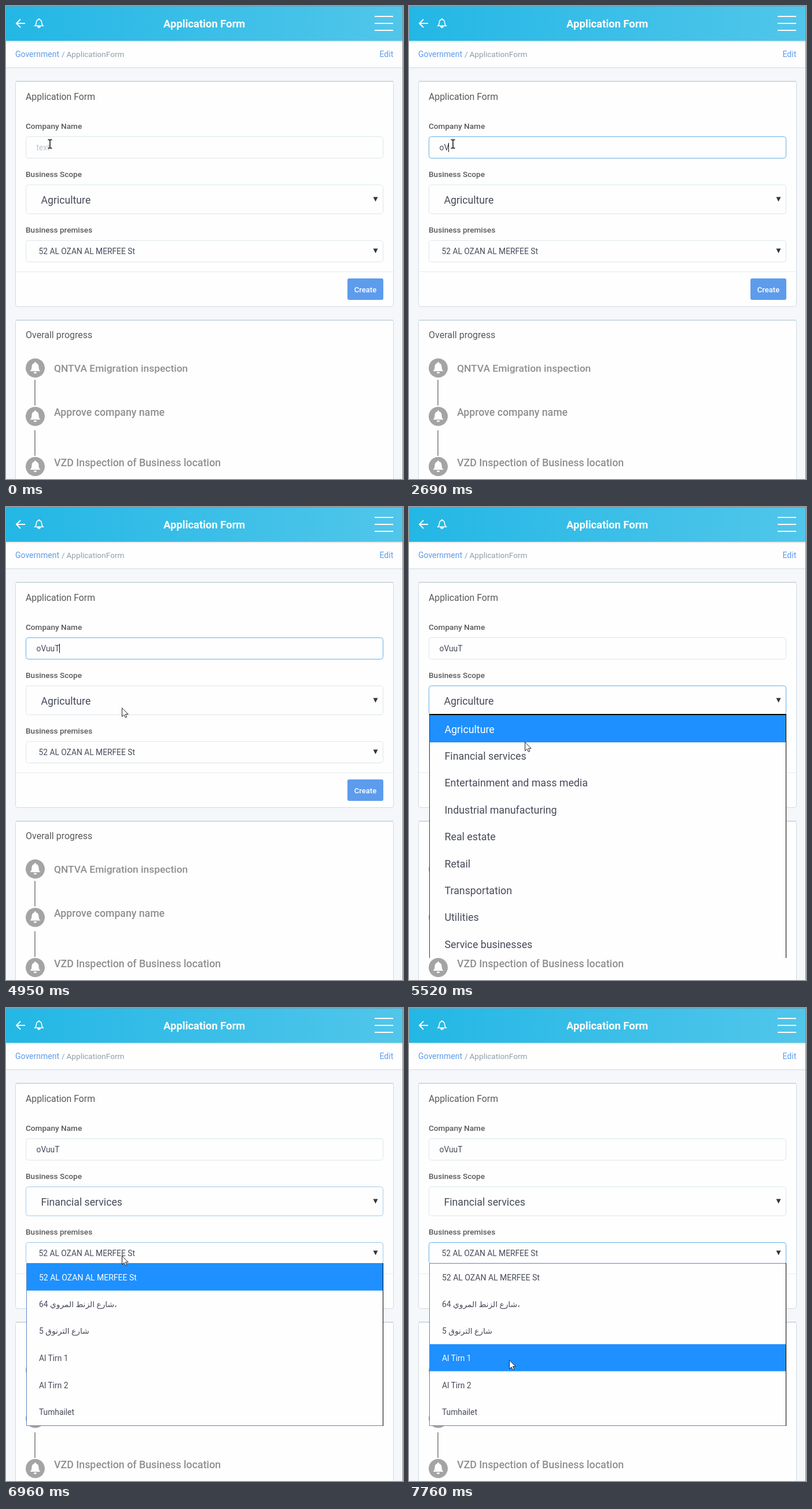
An HTML page for the animation above (8000 ms loop, 686 by 816 pixels).

```html
<!DOCTYPE html>
<html lang="en">
<head>
<meta charset="utf-8">
<title>Application Form</title>
<style>
html, body { margin: 0; width: 100%; height: 100%; overflow: hidden; background: #f5f7fa; }
svg { display: block; width: 686px; height: 816px; font-family: Roboto, 'DejaVu Sans', sans-serif; }
text { white-space: pre; }

.title { fill: #58595b; font-size: 16px; }
.label { fill: #58595b; font-size: 13.6px; font-weight: 500; }
.link { fill: #5d9cec; font-size: 14px; }
.step { fill: #8f8f8f; font-size: 17.7px; font-weight: 500; }
.value { fill: #474b5a; font-size: 13.8px; }
.large { font-size: 17.7px; }
.card { fill: #fefefe; stroke: #cfdbe2; }
.box { fill: #fefefe; stroke: #dde6e9; }
.line { fill: none; stroke: #fff; stroke-width: 2; }

.anim, .on { animation-duration: 8s; animation-iteration-count: infinite; animation-timing-function: linear; }
.on { animation-timing-function: step-end; }

/* focus rings */
@keyframes focusName {
  0%, 12.1%, 66.9%, to { stroke: #dde6e9 }
  13.875%, 65.3% { stroke: #66afe9 }
}
@keyframes focusScope {
  0%, 65.1%, 87.75%, to { stroke: #dde6e9 }
  66.9%, 86.2% { stroke: #66afe9 }
}
@keyframes focusPlace {
  0%, 86% { stroke: #dde6e9 }
  87.75%, to { stroke: #66afe9 }
}

/* typing */
@keyframes hint { 0% { visibility: visible } 28.125%, to { visibility: hidden } }
@keyframes key1 { 0% { visibility: hidden } 28.125%, to { visibility: visible } }
@keyframes key2 { 0% { visibility: hidden } 33.625%, to { visibility: visible } }
@keyframes key3 { 0% { visibility: hidden } 38.125%, to { visibility: visible } }
@keyframes key4 { 0% { visibility: hidden } 40.5%, to { visibility: visible } }
@keyframes key5 { 0% { visibility: hidden } 46.75%, to { visibility: visible } }
@keyframes caret {
  0% { opacity: 0; transform: translateX(53px) }
  12.375% { opacity: 1; transform: translateX(53px) }
  18.25% { opacity: 0; transform: translateX(53px) }
  25.25% { opacity: 1; transform: translateX(53px) }
  28.125% { opacity: 1; transform: translateX(60px) }
  33.625% { opacity: 1; transform: translateX(68px) }
  38.125% { opacity: 1; transform: translateX(76px) }
  40.5% { opacity: 1; transform: translateX(84px) }
  46.75% { opacity: 1; transform: translateX(92px) }
  53.625% { opacity: 0; transform: translateX(92px) }
  60.5% { opacity: 1; transform: translateX(92px) }
  65.375%, to { opacity: 0; transform: translateX(92px) }
}

/* lists */
@keyframes before { 0% { visibility: visible } 77%, to { visibility: hidden } }
@keyframes after { 0% { visibility: hidden } 77%, to { visibility: visible } }
@keyframes scopeList { 0% { visibility: hidden } 66.125% { visibility: visible } 77%, to { visibility: hidden } }
@keyframes placeList { 0% { visibility: hidden } 87%, to { visibility: visible } }
@keyframes scopeBar { 0% { transform: none } 69.71%, to { transform: translateY(46.4px) } }
@keyframes placeBar {
  0% { transform: none }
  90.19% { transform: translateY(46.4px) }
  92.34% { transform: translateY(92.8px) }
  95.7%, to { transform: translateY(139.2px) }
}
@keyframes scope1 { 0% { fill: #fff } 69.71%, to { fill: #474b5a } }
@keyframes scope2 { 0% { fill: #474b5a } 69.71%, to { fill: #fff } }
@keyframes place1 { 0% { fill: #fff } 90.19%, to { fill: #474b5a } }
@keyframes place2 { 0% { fill: #474b5a } 90.19% { fill: #fff } 92.34%, to { fill: #474b5a } }
@keyframes place3 { 0% { fill: #474b5a } 92.34% { fill: #fff } 95.7%, to { fill: #474b5a } }
@keyframes place4 { 0% { fill: #474b5a } 95.7%, to { fill: #fff } }

/* pointer */
@keyframes beam { 0% { visibility: visible } 58.97%, to { visibility: hidden } }
@keyframes arrow { 0% { visibility: hidden } 58.97%, to { visibility: visible } }
@keyframes move {
  0% { transform: translate(76px, 238px) }
  58.25% { transform: translate(76px, 238px); animation-timing-function: steps(6, jump-start) }
  62.6% { transform: translate(200px, 346px) }
  66.875% { transform: translate(200px, 346px); animation-timing-function: steps(4, jump-start) }
  69.71% { transform: translate(200px, 405px); animation-timing-function: steps(3, jump-start) }
  72.21% { transform: translate(201px, 427px) }
  83.875% { transform: translate(200px, 427px) }
  87.34% { transform: translate(200px, 427px); animation-timing-function: steps(7, jump-start) }
  92.34% { transform: translate(173px, 541px); animation-timing-function: steps(6, jump-start) }
  96.375% { transform: translate(173px, 599px); animation-timing-function: steps(2, jump-start) }
  97.6%, to { transform: translate(173px, 607px) }
}
</style>
</head>
<body>
<svg viewBox="0 0 686 816">
  <defs>
    <linearGradient id="bar"><stop stop-color="#23b7e5"/><stop offset="1" stop-color="#51c6ea"/></linearGradient>
    <linearGradient id="shade" x2="0" y2="1"><stop stop-color="#000" stop-opacity=".14"/><stop offset="1" stop-color="#000" stop-opacity="0"/></linearGradient>
    <path id="bell" d="M-9 5.5C-6.4 3.4-6.2 1-6-2.5C-5.8-6-3.6-8-1.3-8.4V-9.2A1.3 1.3 0 0 1 1.3-9.2V-8.4C3.6-8 5.8-6 6-2.5C6.2 1 6.4 3.4 9 5.5ZM-2.6 7H2.6A2.6 2.6 0 0 1-2.6 7Z"/>
    <g id="badge"><circle r="16.5" fill="#a4a4a4"/><use href="#bell" fill="#fff"/></g>
    <path id="down" d="M0 0H8L4 8Z" fill="#333640"/>
  </defs>

  <rect width="686" height="816" fill="#f5f7fa"/>
  <rect y="60" width="686" height="46" fill="#fefefe"/>
  <rect y="106" width="686" height="1" fill="#cfdbe2"/>
  <rect width="686" height="60" fill="url(#bar)"/>
  <rect y="60" width="686" height="3" fill="url(#shade)"/>
  <path class="line" d="M33 30H18M25 23L18 30L25 37"/>
  <g transform="translate(57 30) scale(.76)"><use href="#bell" class="line"/></g>
  <path class="line" d="M637 18H669M637 30H669M637 42H669"/>
  <text x="342.7" y="36.7" fill="#fff" font-size="18.4" font-weight="700" text-anchor="middle">Application Form</text>
  <text class="link" x="16" y="88">Government</text>
  <text x="96" y="88" fill="#909fa7" font-size="13.6">/</text>
  <text x="104.5" y="88" fill="#909fa7" font-size="13.6">ApplicationForm</text>
  <text class="link" x="645.5" y="88">Edit</text>

  <rect class="card" x="16.5" y="129.5" width="653" height="389" rx="4"/>
  <rect x="17" y="129" width="652" height="2" fill="#cfdbe2"/>
  <text class="title" x="34" y="161.5" style="font-size:15.8px">Application Form</text>
  <text class="label" x="34" y="212.3">Company Name</text>
  <text class="label" x="34" y="295.3">Business Scope</text>
  <text class="label" x="34" y="391">Business premises</text>
  <path d="M17 458.5H669" stroke="#e6ecef"/>
  <rect x="590" y="470" width="62" height="37" rx="3" fill="#5d9cec"/>
  <text x="621" y="493.5" fill="#fff" font-size="13.1" font-weight="500" text-anchor="middle">Create</text>

  <rect class="box anim" style="animation-name:focusName" x="34.5" y="225.5" width="617" height="37" rx="4"/>
  <text class="value on" x="52.5" y="249" style="fill:#bcc2ca;animation-name:hint">text</text>
  <text class="value" x="52.5" y="249"><tspan class="on" style="animation-name:key1">o</tspan><tspan class="on" style="animation-name:key2">V</tspan><tspan class="on" style="animation-name:key3">u</tspan><tspan class="on" style="animation-name:key4">u</tspan><tspan class="on" style="animation-name:key5">T</tspan></text>
  <rect class="on" style="animation-name:caret" y="236" width="1" height="16" fill="#111"/>

  <rect class="box anim" style="animation-name:focusScope" x="34.5" y="308.5" width="617" height="50" rx="4"/>
  <text class="value large on" x="60.5" y="340.5" style="animation-name:before">Agriculture</text>
  <text class="value large on" x="60.5" y="340.5" style="animation-name:after">Financial services</text>
  <use href="#down" x="634.5" y="329.5"/>

  <rect class="box anim" style="animation-name:focusPlace" x="34.5" y="404.5" width="617" height="37" rx="4"/>
  <text class="value" x="56.5" y="428">52 AL OZAN AL MERFEE St</text>
  <use href="#down" x="634.5" y="418.5"/>

  <rect class="card" x="16.5" y="541.5" width="653" height="300" rx="4"/>
  <rect x="17" y="541" width="652" height="2" fill="#cfdbe2"/>
  <text class="title" x="34" y="573.3">Overall progress</text>
  <path d="M50 645V689M50 732V776" stroke="#999" stroke-width="2"/>
  <use href="#badge" x="50.5" y="624.5"/>
  <use href="#badge" x="50.5" y="708"/>
  <use href="#badge" x="50.5" y="794.5"/>
  <text class="step" x="83" y="631" style="font-size:17.4px">QNTVA Emigration inspection</text>
  <text class="step" x="83" y="706.8">Approve company name</text>
  <text class="step" x="83" y="793.5" style="font-size:17.8px">VZD Inspection of Business location</text>

  <g class="on" style="animation-name:scopeList">
    <rect x="35" y="357" width="617" height="421" fill="#fefefe"/>
    <rect class="on" style="animation-name:scopeBar" x="36" y="359" width="615" height="47" fill="#1e90ff"/>
    <path d="M35.5 358V778" stroke="#2f3b52"/>
    <path d="M651.5 358V778" stroke="#000"/>
    <path d="M35 358H652" stroke="#000" stroke-width="2"/>
    <g class="value" style="font-size:17.8px">
      <text class="on" style="animation-name:scope1" x="61.5" y="389.5">Agriculture</text>
      <text class="on" style="animation-name:scope2" x="61.5" y="436">Financial services</text>
      <text x="61.5" y="482.3">Entertainment and mass media</text>
      <text x="61.5" y="528.7">Industrial manufacturing</text>
      <text x="61.5" y="575.1">Real estate</text>
      <text x="61.5" y="621.5">Retail</text>
      <text x="61.5" y="667.9">Transportation</text>
      <text x="61.5" y="714.3">Utilities</text>
      <text x="61.5" y="760.7">Service businesses</text>
    </g>
  </g>

  <g class="on" style="animation-name:placeList">
    <rect x="35" y="440" width="617" height="281" fill="#fefefe"/>
    <rect class="on" style="animation-name:placeBar" x="36" y="441" width="615" height="46.5" fill="#1e90ff"/>
    <path d="M651.5 440.5H35.5V720.5H651.5" fill="none" stroke="#5b87c5"/>
    <path d="M651.5 440V721" stroke="#000"/>
    <g class="value">
      <text class="on" style="animation-name:place1" x="57" y="469.5" font-size="14">52 AL OZAN AL MERFEE St</text>
      <text class="on" style="animation-name:place2" x="57" y="515.5">64 شارع الزنط المروي،</text>
      <text class="on" style="animation-name:place3" x="57" y="562">5 شارع الترنوق</text>
      <text class="on" style="animation-name:place4" x="57" y="609">Al Tirn 1</text>
      <text x="57" y="655.5">Al Tirn 2</text>
      <text x="57" y="702">Tumhailet</text>
    </g>
  </g>

  <!-- window edge -->
  <path d="M0 .5H686" stroke="#6c9db0"/>
  <path d="M685.5 0V816" stroke="#85878a"/>

  <g class="on" style="animation-name:move">
    <path class="on" style="animation-name:beam" d="M-3.5-7.3H-1L0-6.5L1-7.3H3.5M0-6.5V6.5M-3.5 7.3H-1L0 6.5L1 7.3H3.5" fill="none" stroke="#111" stroke-width="1.5"/>
    <path class="on" style="animation-name:arrow" d="M.5 .8V15.6L4 12.4L6.4 17.4L8.7 16.3L6.4 11.4H11.1Z" fill="#fff" stroke="#222"/>
  </g>
</svg>
</body>
</html>
```
